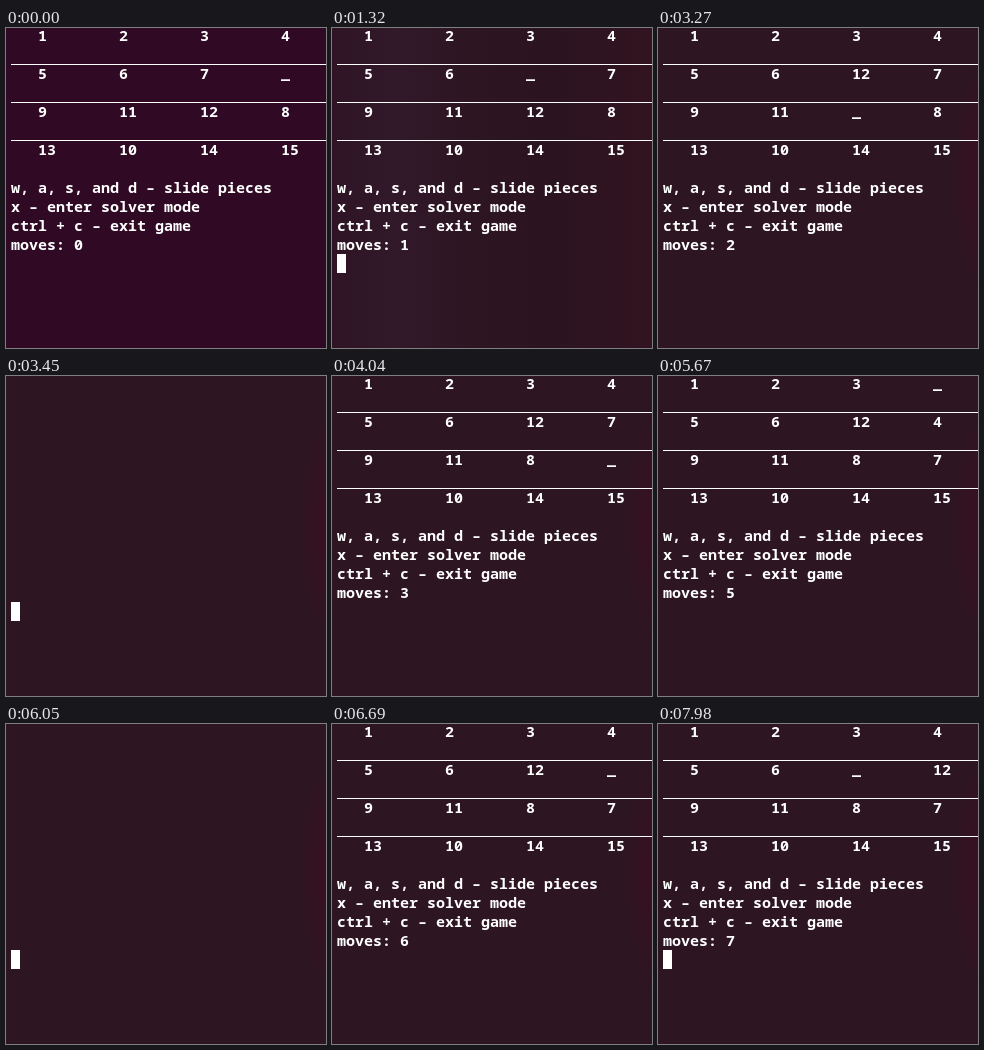
An HTML page for the animation above (8000 ms loop, 320 by 320 pixels).

```html
<!DOCTYPE html>
<html lang="en">
<head>
<meta charset="utf-8">
<title>Fifteen puzzle in a terminal</title>
<style>
html, body { margin: 0; width: 100%; height: 100%; overflow: hidden; background: #300a24; }
svg { display: block; }
#stage { width: 100vw; height: 100vh; }
text { font: 600 15px "Noto Sans Mono", "DejaVu Sans Mono", monospace; fill: #fff; white-space: pre; }

.bg, .screen, .cursor, .tile, .count { animation: 8s step-end infinite; }
.early { animation-name: early; }
.late { animation-name: late; }
.screen { animation-name: redraw; }
.cursor { animation-name: blink; fill: #fff; }
.count { animation-name: count; }
.gap { animation-name: gap; }
.t4 { animation-name: t4; }
.t7 { animation-name: t7; }
.t8 { animation-name: t8; }
.t12 { animation-name: t12; }

@keyframes early { 0%, 32% { opacity: 0 } 16.5% { opacity: 1 } }
@keyframes late { 0% { opacity: 0 } 32%, 100% { opacity: 1 } }

/* the terminal is cleared for a moment before some redraws */
@keyframes redraw {
  0%, 44.25%, 56.875%, 76.625%, 100% { opacity: 1 }
  43.125%, 56%, 75.625% { opacity: 0 }
}
@keyframes blink {
  0%, 13.375%, 24.625%, 40.875%, 50.5%, 70.875%, 83.625%, 93.625% { opacity: 0 }
  7%, 16.5%, 32%, 43.125%, 56%, 75.625%, 85.875%, 99.75%, 100% { opacity: 1 }
}
@keyframes count {
  0% { transform: translateY(0) }
  16.5% { transform: translateY(-19px) }
  33.125% { transform: translateY(-38px) }
  44.25% { transform: translateY(-57px) }
  56.875% { transform: translateY(-76px) }
  63.5% { transform: translateY(-95px) }
  76.625% { transform: translateY(-114px) }
  85.875%, 100% { transform: translateY(-133px) }
}

/* board cells are 81 by 38 */
@keyframes gap {
  0%, 56.875%, 76.625% { transform: translate(243px, 38px) }
  16.5%, 85.875%, 100% { transform: translate(162px, 38px) }
  33.125% { transform: translate(162px, 76px) }
  44.25% { transform: translate(243px, 76px) }
  63.5% { transform: translate(243px, 0) }
}
@keyframes t4 {
  0%, 76.625%, 100% { transform: translate(243px, 0) }
  63.5% { transform: translate(243px, 38px) }
}
@keyframes t7 {
  0% { transform: translate(162px, 38px) }
  16.5% { transform: translate(243px, 38px) }
  56.875%, 100% { transform: translate(243px, 76px) }
}
@keyframes t8 {
  0% { transform: translate(243px, 76px) }
  44.25%, 100% { transform: translate(162px, 76px) }
}
@keyframes t12 {
  0% { transform: translate(162px, 76px) }
  33.125% { transform: translate(162px, 38px) }
  85.875%, 100% { transform: translate(243px, 38px) }
}
</style>
</head>
<body>
<svg id="stage" viewBox="0 0 320 320">
  <defs>
    <linearGradient id="earlyTint">
      <stop offset="0" stop-color="#2e1424"/>
      <stop offset=".2" stop-color="#32192a"/>
      <stop offset=".42" stop-color="#2d1522"/>
      <stop offset=".7" stop-color="#2b1420"/>
      <stop offset="1" stop-color="#331320"/>
    </linearGradient>
    <radialGradient id="glow">
      <stop offset="0" stop-color="#3a1020"/>
      <stop offset="1" stop-color="#3a1020" stop-opacity="0"/>
    </radialGradient>
  </defs>

  <rect width="320" height="320" fill="#300a24"/>
  <rect class="bg early" width="320" height="320" fill="url(#earlyTint)"/>
  <g class="bg late">
    <rect width="320" height="320" fill="#2d1522"/>
    <ellipse cx="322" cy="150" rx="30" ry="120" fill="url(#glow)"/>
  </g>

  <g class="screen">
    <path d="M5 36.5H320M5 74.5H320M5 112.5H320" stroke="#fff" shape-rendering="crispEdges"/>

    <text x="32" y="13">1</text>
    <text x="113" y="13">2</text>
    <text x="194" y="13">3</text>
    <text x="32" y="51">5</text>
    <text x="113" y="51">6</text>
    <text x="32" y="89">9</text>
    <text x="113" y="89">11</text>
    <text x="32" y="127">13</text>
    <text x="113" y="127">10</text>
    <text x="194" y="127">14</text>
    <text x="275" y="127">15</text>

    <text class="tile t4" x="32" y="13">4</text>
    <text class="tile t7" x="32" y="13">7</text>
    <text class="tile t8" x="32" y="13">8</text>
    <text class="tile t12" x="32" y="13">12</text>
    <text class="tile gap" x="32" y="12">_</text>

    <text x="5" y="165">w, a, s, and d – slide pieces</text>
    <text x="5" y="184">x – enter solver mode</text>
    <text x="5" y="203">ctrl + c – exit game</text>
    <text x="5" y="222">moves:</text>
    <svg x="68" y="207" width="9" height="19" overflow="hidden">
      <g class="count">
        <text y="15">0</text>
        <text y="34">1</text>
        <text y="53">2</text>
        <text y="72">3</text>
        <text y="91">4</text>
        <text y="110">5</text>
        <text y="129">6</text>
        <text y="148">7</text>
      </g>
    </svg>
  </g>

  <rect class="cursor" x="5" y="226" width="9" height="19"/>
</svg>
</body>
</html>
```
